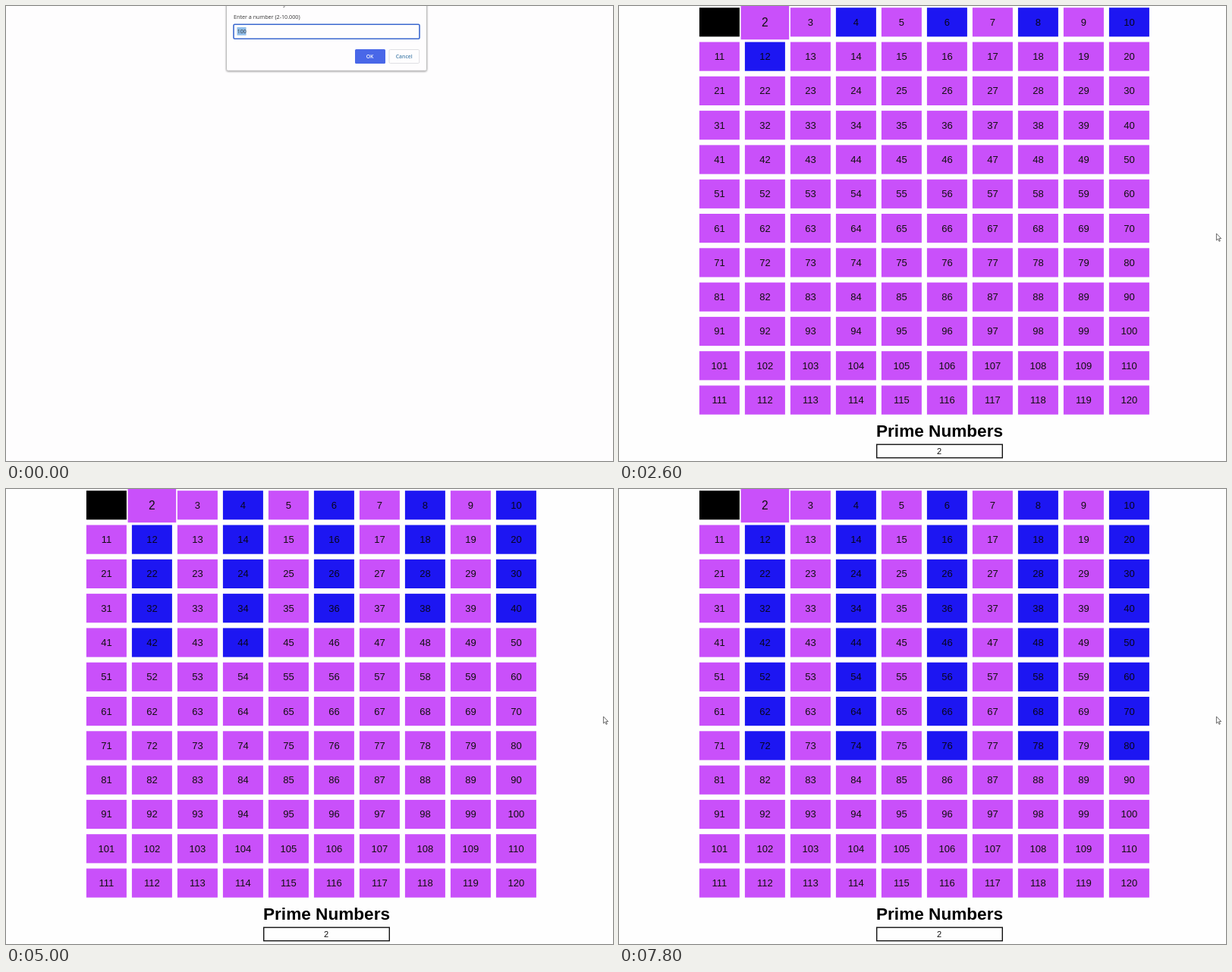
Recreate the animation shown at these times as an HTML page. Size 800 by 600 pixels, loop 8000 ms.

```html
<!DOCTYPE html>
<html lang="en">
<head>
<meta charset="utf-8">
<title>Prime sieve</title>
<style>
  html, body { margin: 0; width: 100%; height: 100%; overflow: hidden; background: #fefdfe; }
  svg { display: block; width: 800px; height: 600px; }
  #dialog { font: 7.2px "Open Sans", "Noto Sans", sans-serif; fill: #333; }
  #dialog .button { font-size: 6.8px; font-weight: 600; text-anchor: middle; }
  #sieve { font: 13px "Liberation Sans", Arial, sans-serif; fill: #101010; }
  #cells text, #found { text-anchor: middle; }
  #cells rect { fill: #c950fa; }
  #cells .marked rect { fill: #1d16f2; }
  #cells .marked text { fill: #08061e; }
  #cells .unit rect { fill: #000; }
  #sieve h1, #heading { font-size: 22.6px; font-weight: bold; fill: #000; }
  #found { font-size: 11px; }
</style>
</head>
<body>
<svg viewBox="0 0 800 600">
  <defs>
    <filter id="shadow" x="-5%" y="-10%" width="110%" height="125%">
      <feDropShadow dx="0" dy="0.8" stdDeviation="0.9" flood-color="#000" flood-opacity="0.4"/>
    </filter>
  </defs>

  <g id="dialog">
    <rect x="290.5" y="-20" width="264" height="105.3" rx="2" fill="#fefdfe" stroke="#b4b4b4" stroke-width="0.8" filter="url(#shadow)"/>
    <text x="365.3" y="-0.2">y</text>
    <text x="300" y="16.6">Enter a number (2-10.000)</text>
    <rect x="300" y="24.2" width="245" height="19" rx="1.5" fill="#fefdfe" stroke="#3b68cf" stroke-width="1.6"/>
    <rect id="selection" x="304.5" y="28" width="12" height="10.6" fill="#8fbdea"/>
    <text id="entry" x="304.7" y="36.2" style="font-size:7px"></text>
    <rect id="caret" y="28.3" width="0.9" height="10" fill="#222"/>
    <rect x="460" y="57" width="40" height="19" rx="1.5" fill="#4967e8"/>
    <text class="button" x="479.5" y="69" fill="#fff">OK</text>
    <rect x="505" y="57.5" width="39.7" height="18" rx="1.5" fill="#fefdfe" stroke="#dcdce0" stroke-width="0.9"/>
    <text class="button" x="524.7" y="69" fill="#4c82ad">Cancel</text>
  </g>

  <g id="sieve">
    <rect width="800" height="600" fill="#fefefe"/>
    <g id="cells"></g>
    <text id="heading" x="339" y="568">Prime Numbers</text>
    <rect x="339.7" y="578.2" width="165.6" height="17.6" fill="#fefefe" stroke="#111" stroke-width="1.4"/>
    <text id="found" x="422" y="591">2</text>
  </g>

  <path id="pointer" d="M0.4 0.4V9.4L2.5 7.5L4 10.8L5.3 10.2L3.9 7H6.7Z" fill="#fff" stroke="#444" stroke-width="0.8"/>
</svg>

<script>
  const LOOP = 8000, TICK = 200, GRID_START = 2000, MARK_EVERY = 152;
  const COLS = 10, LIMIT = 120;
  const byId = id => document.getElementById(id);
  const show = (el, on) => { el.style.display = on ? '' : 'none'; };

  const [dialog, sieve, entry, caret, selection, pointer] =
    ['dialog', 'sieve', 'entry', 'caret', 'selection', 'pointer'].map(byId);

  function add(parent, tag, attrs) {
    const el = document.createElementNS('http://www.w3.org/2000/svg', tag);
    for (const key in attrs) el.setAttribute(key, attrs[key]);
    return parent.appendChild(el);
  }

  function makeCell(n) {
    const x = 132.4 + (n - 1) % COLS * 60;
    const y = 21.3 + Math.floor((n - 1) / COLS) * 45.3;
    const scale = n === 2 ? 1.2 : 1;
    const cell = add(byId('cells'), 'g', { transform: `translate(${x} ${y}) scale(${scale})` });
    add(cell, 'rect', { x: -26.5, y: -19.1, width: 53, height: 38.2 });
    if (n === 1) cell.classList.add('unit');
    else add(cell, 'text', { y: 4.4 }).textContent = n;
    return cell;
  }
  const cells = Array.from({ length: LIMIT }, (_, i) => makeCell(i + 1));

  function drawDialog(t) {
    const typed = '120'.slice(0, Math.floor((t - 400) / 400));
    const untouched = t < 800;
    entry.textContent = untouched ? '100' : typed;
    show(selection, untouched);
    show(caret, !untouched);
    caret.setAttribute('x', 304.5 + typed.length * 4);
  }

  function drawSieve(t) {
    const marks = 1 + Math.floor((t - GRID_START) / MARK_EVERY + 0.5);
    const last = 2 + 2 * marks;
    cells.forEach((cell, i) => {
      const n = i + 1;
      cell.classList.toggle('marked', n > 2 && n % 2 === 0 && n <= last);
    });
  }

  function draw(t) {
    const inGrid = t >= GRID_START;
    show(dialog, !inGrid);
    show(sieve, inGrid);
    if (inGrid) drawSieve(t); else drawDialog(t);
    show(pointer, t >= 200);
    pointer.setAttribute('transform', t < 400 ? 'translate(357 12)' : 'translate(787 299.6)');
  }

  const start = performance.now();
  let shown = -1;
  function frame() {
    const t = Math.floor((performance.now() - start) % LOOP / TICK) * TICK;
    if (t !== shown) draw(shown = t);
    requestAnimationFrame(frame);
  }
  frame();
</script>
</body>
</html>
```
